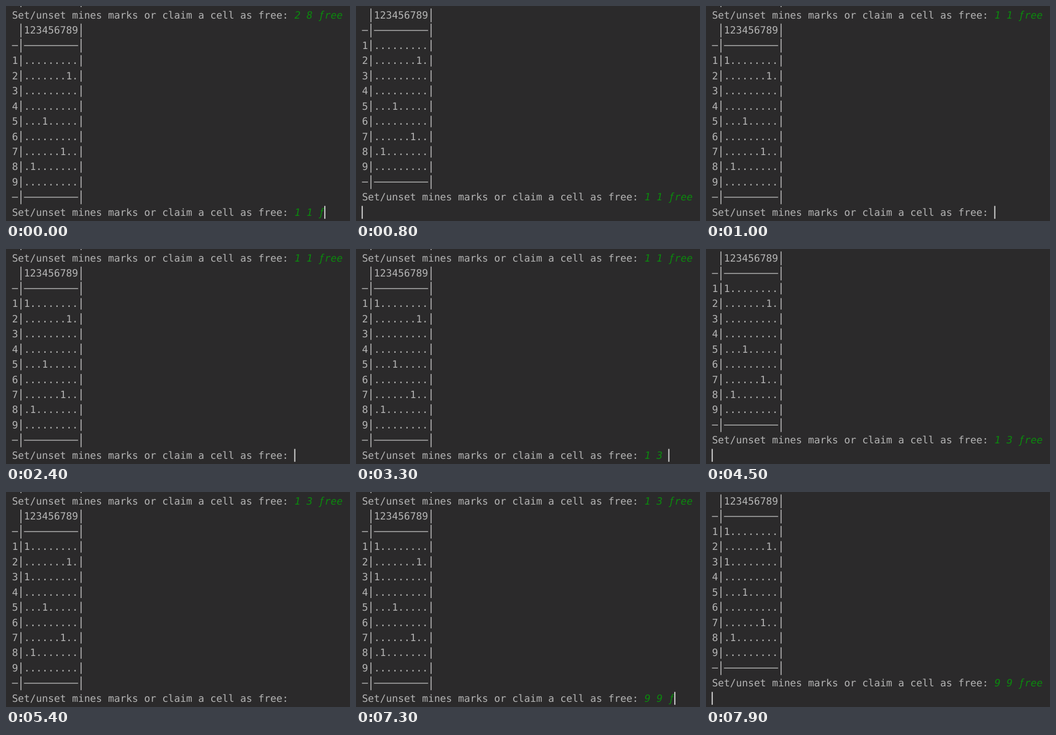
An HTML page that plays this animation: 600x375 px, repeating every 8000 ms.

```html
<!DOCTYPE html>
<html lang="en">
<head>
<meta charset="utf-8">
<title>Minesweeper console</title>
<style>
  html, body { margin: 0; width: 100%; height: 100%; overflow: hidden; background: #2b2a2b; }
  svg { display: block; width: 600px; height: 375px; }
  text { font: 17.42px "DejaVu Sans Mono", monospace; fill: #b5b5b5; white-space: pre; text-rendering: geometricPrecision; }
  rect { fill: #b0b0b0; }
  .input { fill: #0b8a0d; font-style: italic; text-anchor: middle; }
  .tail { font-family: "Noto Sans", "Open Sans", sans-serif; font-size: 18px; }
  .caret { fill: #d0d0d0; }
</style>
</head>
<body>
<svg id="stage" viewBox="0 0 600 375"></svg>
<script>
const NS = "http://www.w3.org/2000/svg";
const stage = document.getElementById("stage");
const LOOP = 8000, LEFT = 10.4, ADV = 10.487, LINE = 26.45, MID = 15.8;
const PROMPT = "Set/unset mines marks or claim a cell as free: ";

// Each round: previous input, marks on the board as "row,column", typed input by time.
const rounds = [
  { from: 0, prev: "2 8 free", marks: [],
    typed: [[0, "1 1 f"], [100, "1 1 fr"], [300, "1 1 fre"], [500, "1 1 free"]], enter: 800 },
  { from: 1000, prev: "1 1 free", marks: ["1,1"],
    typed: [[1000, ""], [2600, "1"], [2800, "1 "], [3000, "1 3"], [3200, "1 3 "],
            [3500, "1 3 f"], [3700, "1 3 fr"], [4000, "1 3 fre"], [4200, "1 3 free"]], enter: 4500 },
  { from: 4700, prev: "1 3 free", marks: ["1,1", "3,1"],
    typed: [[4700, ""], [6600, "9 "], [6900, "9 9"], [7200, "9 9 "], [7300, "9 9 f"],
            [7500, "9 9 fr"], [7600, "9 9 fre"], [7800, "9 9 free"]], enter: 7900 }
];
const hidden = [[1700, 2400], [5400, 5800], [6400, 6600]];
const fixedMarks = ["2,8", "5,4", "7,7", "8,2"];

const colX = col => LEFT + col * ADV;
const midY = row => MID + row * LINE;

function add(tag, attrs, content) {
  const el = document.createElementNS(NS, tag);
  for (const name in attrs) el.setAttribute(name, attrs[name]);
  if (content) el.textContent = content;
  stage.appendChild(el);
}

function print(row, str, col = 0) {
  add("text", { x: colX(col), y: midY(row) + 6.1 }, str);
}

function bars(row, height) {
  for (const col of [1.5, 11.5])
    add("rect", { x: colX(col) - 0.9, y: midY(row) - height / 2 + 0.5, width: 1.7, height });
}

function rule(row) {
  bars(row, 24);
  for (const [col, cells] of [[0, 1], [2, 9]])
    add("rect", { x: colX(col), y: midY(row) - 0.4, width: cells * ADV, height: 1.5 });
}

function promptLine(row, input) {
  print(row, PROMPT);
  [...input].forEach((ch, i) => {
    if (ch === " ") return;
    add("text", {
      class: ch === "f" ? "input tail" : "input",
      x: colX(PROMPT.length + i + 0.5), y: midY(row) + 6.1
    }, ch);
  });
}

function board(top, marks) {
  print(top, "123456789", 2);
  bars(top, 24);
  rule(top + 1);
  for (let r = 1; r <= 9; r++) {
    let cells = "";
    for (let c = 1; c <= 9; c++) cells += marks.includes(r + "," + c) ? "1" : ".";
    print(top + 1 + r, r + " " + cells);
    bars(top + 1 + r, 20);
  }
  rule(top + 11);
}

let shown = "";
function draw(t) {
  const round = rounds.filter(r => r.from <= t).pop();
  const input = round.typed.filter(k => k[0] <= t).pop()[1];
  const entered = t >= round.enter;
  const caretOn = !hidden.some(([a, b]) => t >= a && t < b);
  const key = [round.from, input, entered, caretOn].join("|");
  if (key === shown) return;
  shown = key;

  stage.replaceChildren();
  const top = entered ? -1 : 0;
  rule(top - 1);
  promptLine(top, round.prev);
  board(top + 1, [...fixedMarks, ...round.marks]);
  promptLine(top + 13, input);
  if (caretOn) {
    const col = entered ? 0 : PROMPT.length + input.length;
    add("rect", { class: "caret", x: colX(col) - 0.6, y: midY(13) - 11, width: 2, height: 22.5 });
  }
}

const start = performance.now();
function tick() {
  draw((performance.now() - start) % LOOP);
  requestAnimationFrame(tick);
}
tick();
</script>
</body>
</html>
```
